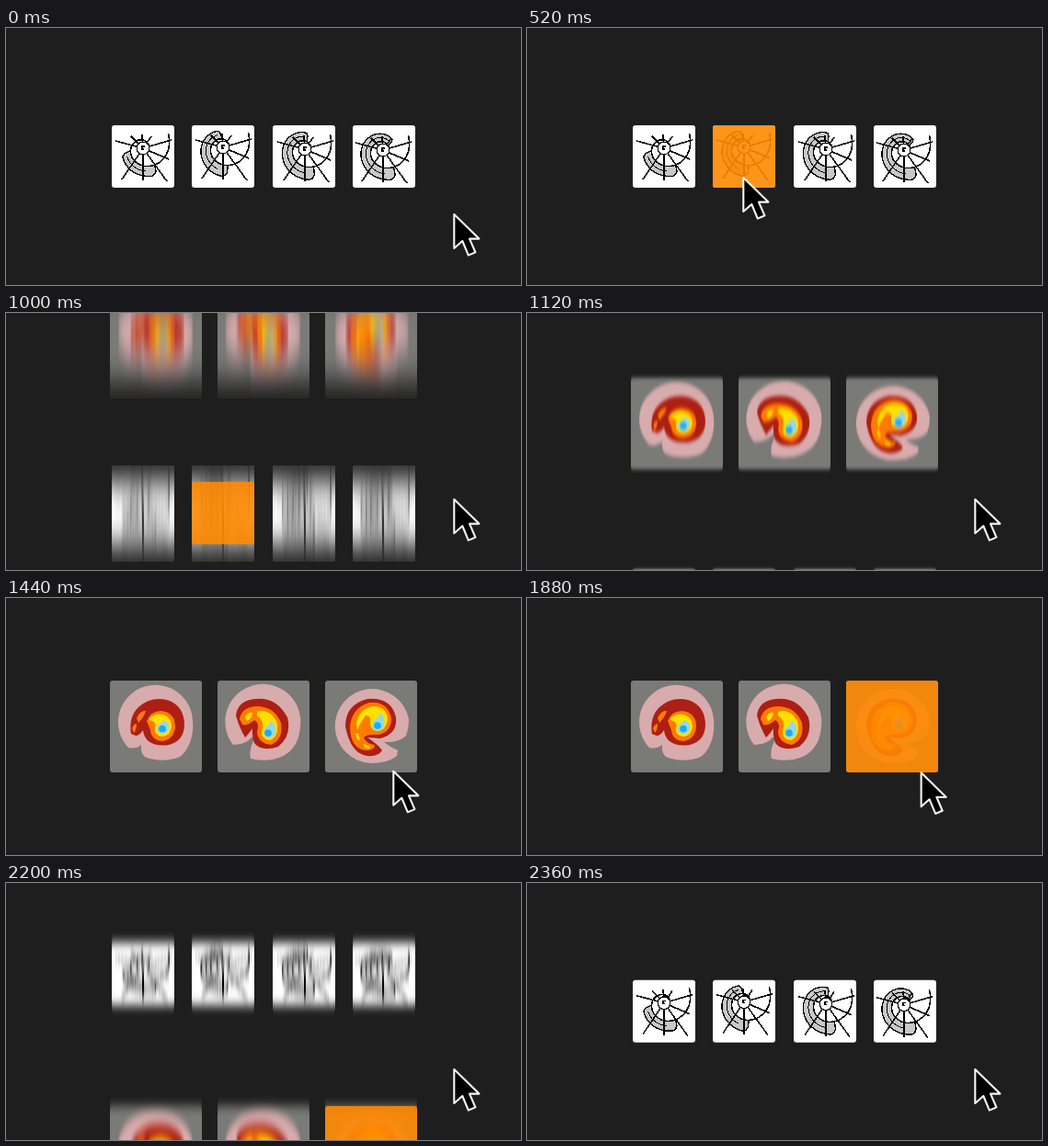
Recreate the animation shown at these times as an HTML page. Size 560 by 280 pixels, loop 2.4 s.

```html
<!DOCTYPE html>
<html lang="en">
<head>
<meta charset="utf-8">
<title>Picker</title>
<style>
  html, body { margin: 0; width: 100%; height: 100%; overflow: hidden; background: #1e1e1e; }
  svg { display: block; width: 560px; height: 280px; }
</style>
</head>
<body>
<svg id="stage" viewBox="0 0 560 280">
  <defs>
    <filter id="blurA" filterUnits="userSpaceOnUse" x="0" y="-18" width="560" height="104" color-interpolation-filters="sRGB"><feGaussianBlur stdDeviation="0 0"/></filter>
    <filter id="blurB" filterUnits="userSpaceOnUse" x="0" y="-18" width="560" height="136" color-interpolation-filters="sRGB"><feGaussianBlur stdDeviation="0 0"/></filter>
  </defs>
  <g id="rowA"><g class="tiles"></g><rect class="pick" x="202" width="68" height="68" rx="3"/></g>
  <g id="rowB"><g class="tiles"></g><rect class="pick" x="347" width="100" height="100" rx="3"/></g>
  <path id="cursor" d="M1.3 2V39L10.3 31L16.8 46.6L24.4 43.4L18 28.6H28.4Z" fill="#000" stroke="#f4f4f4" stroke-width="2.1" stroke-linejoin="round"/>
</svg>
<script>
const LOOP = 2400, STEP = 40, TRAVEL = 194;
const HOME = [486, 201], PICK_A = [234, 161], PICK_B = [398, 182];
const $ = s => document.querySelector(s);
const path = (d, fill, extra = '') => `<path d="${d}" fill="${fill}" ${extra}/>`;

// Points around a centre; angles run counter-clockwise from the top.
function curve([cx, cy], radius, from, to) {
  const pts = [], n = Math.ceil(Math.abs(to - from) / 0.1);
  for (let i = 0; i <= n; i++) {
    const a = from + (to - from) * i / n, r = radius(a);
    pts.push((cx - r * Math.sin(a)).toFixed(1) + ' ' + (cy - r * Math.cos(a)).toFixed(1));
  }
  return pts.join('L');
}

// Sketched shells: x, centre, outer radius, start and end angle of the grey chamber.
const shells = [
  [115, [34, 25], 16.5, 1.75, 3.75],
  [202, [34, 24], 17.5, 0.1, 3.4],
  [290, [35, 26], 18, -0.3, 3.6],
  [377, [33, 27], 17.5, -0.9, 3.7]
];
const rays = [[-30, -8], [-13, -13], [-1, -15], [9, -13], [31, -9], [28, 12], [26, 36], [0, 35], [-23, 34]];

function shell([x, c, size, from, to]) {
  const inner = a => 9 * Math.exp(0.24 * a);
  const full = a => size * Math.exp(0.19 * a);
  const taper = a => Math.sqrt(Math.max(0, Math.min(1, (a - from) / 0.2, (to - a) / 0.25)));
  const outer = a => inner(a) + (full(a) - inner(a)) * taper(a);
  const middle = a => (inner(a) + full(a)) / 2;
  const chamber = 'M' + curve(c, outer, from, to) + 'L' + curve(c, inner, to, from) + 'Z';
  const lines = rays.map(([dx, dy]) => {
    const k = 7 / Math.hypot(dx, dy);
    return `M${c[0] + dx * k} ${c[1] + dy * k}L${c[0] + dx} ${c[1] + dy}`;
  }).join('');
  const pen = w => `stroke="#000" stroke-width="${w}"`;
  return `<g transform="translate(${x})" shape-rendering="crispEdges">
    <rect width="68" height="68" rx="3" fill="#fff" shape-rendering="auto"/>
    ${path(chamber, '#c8c8c8', pen(1.4))}
    ${path('M' + curve(c, middle, from + 0.3, to - 0.5), 'none', pen(1))}
    ${path('M' + curve(c, inner, -1.6, 5.25), 'none', pen(1.6))}
    ${path(lines, 'none', pen(1.6))}
    <circle cx="${c[0]}" cy="${c[1]}" r="6.8" fill="#fff" ${pen(1.4)}/>
    ${path(`M${c[0] + 2} ${c[1] - 2}h-3v3h2`, 'none', pen(1.2))}
  </g>`;
}

// Heat maps: x, core, then pink, red, orange, yellow and pale layers.
const heat = ['#d8abad', '#ad1f12', '#ff7b00', '#ffe000', '#92d8ec'];
const maps = [
  [113, [57, 52.5],
    'M20 73A40.5 40.5 0 1 1 90 44C92 62 84 78 76 83C64 88 50 88 38 83Q33 79 34 70Q28 75 20 73Z',
    'M23 58Q20 40 31 29Q44 17 62 21Q81 27 81 49Q80 66 64 70Q50 72 42 66Q37 62 36 54Q32 60 28 60Z',
    'M40 44Q44 33 56 33Q71 35 71 50Q70 64 57 66Q45 65 44 54ZM29 41Q33 32 39 33Q38 38 31 46ZM24 52Q26 47 29 47Q29 53 26 57Z',
    'M43 41Q50 35 58 37Q67 40 67 50Q66 60 57 61Q48 60 49 52Q52 45 43 43Z',
    'M58 43Q65 45 64 53Q61 59 55 58Q49 55 51 49Q55 48 58 43Z'],
  [230, [55, 57],
    'M17 70A41 41 0 1 1 90 50Q88 80 60 86Q46 88 36 85Q34 76 38 68Q42 60 37 62Q30 70 17 70Z',
    'M20 38Q22 22 40 20Q64 17 76 40Q81 60 66 72Q48 78 40 68Q37 60 38 52Q34 58 30 62Q24 52 20 38Z',
    'M24 42Q26 29 42 28Q62 28 69 46Q72 64 58 70Q44 68 43 56Q46 46 40 43Q32 50 27 48Z',
    'M43 34Q56 30 64 44Q68 60 57 65Q47 64 48 55Q52 44 43 38ZM30 40Q33 34 38 35Q37 42 32 44Z',
    'M57 44Q64 46 63 57Q60 63 54 62Q49 59 51 52Q56 50 57 44Z'],
  [347, [57, 49],
    'M91 42A40.5 40.5 0 1 0 50 90Q68 90 78 82L79 76Q70 72 64 67Q80 68 88 60Q91 52 91 42Z',
    'M22 50Q22 26 46 20Q72 18 77 40Q79 58 60 63Q48 62 46 62Q58 70 62 76Q58 83 46 82Q28 80 22 50Z',
    'M27 52Q28 30 48 24Q68 22 72 41Q72 56 58 59Q46 58 42 62Q45 69 54 70Q54 76 44 76Q28 74 27 52Z',
    'M34 46Q38 30 52 28Q67 28 68 42Q66 55 56 55Q48 53 49 44Q50 38 44 38Q38 46 35 54ZM33 58l3-1 2 8-3-1zM42 69l7 3-1 2-5-1z',
    'M60 35Q66 40 64 50Q60 56 54 54Q49 49 53 43Q58 42 60 35Z']
];

const heatMap = ([x, [bx, by], ...layers]) => `<g transform="translate(${x})">
  <rect width="100" height="100" rx="3" fill="#7a7a77"/>
  ${layers.map((d, i) => path(d, heat[i])).join('')}
  <circle cx="${bx}" cy="${by}" r="3.8" fill="#1eaaf0"/></g>`;

$('#rowA .tiles').innerHTML = shells.map(shell).join('');
$('#rowB .tiles').innerHTML = maps.map(heatMap).join('');
document.querySelectorAll('.pick').forEach(p => p.setAttribute('fill', 'rgba(255,137,2,.9)'));

const clamp = v => Math.min(1, Math.max(0, v));
const ramp = (t, from, to) => clamp((t - from) / (to - from));

// Scroll curve with its slope, which drives the vertical blur.
function scroll(t, start) {
  const x = ramp(t, start, start + 400), a = 5.05, b = 1.45, rest = 1 - x ** b;
  return { pos: 1 - rest ** a, speed: a * b * rest ** (a - 1) * x ** (b - 1) };
}

function place(name, y, blur, picked) {
  const row = $('#row' + name);
  row.setAttribute('transform', `translate(0 ${y.toFixed(2)})`);
  row.querySelector('.pick').style.display = picked ? '' : 'none';
  $(`#blur${name} feGaussianBlur`).setAttribute('stdDeviation', `0 ${blur.toFixed(2)}`);
  const tiles = row.querySelector('.tiles');
  if (blur > 0.1) tiles.setAttribute('filter', `url(#blur${name})`);
  else tiles.removeAttribute('filter');
}

function draw(time) {
  const t = Math.floor(time % LOOP / STEP) * STEP;
  const second = t >= 1640;
  const { pos, speed } = scroll(t, second ? 2040 : 920);
  const blur = 2.9 * speed * speed;
  const leave = TRAVEL * pos, enter = TRAVEL * (pos - 1);
  place('A', 106 + (second ? enter : leave), blur, t >= 520 && !second);
  place('B', 90 + (second ? leave : enter), blur, second);

  const late = t >= 1000, shift = late ? 1120 : 0, goal = late ? PICK_B : PICK_A;
  const k = ramp(t - shift, 200, 360) - ramp(t - shift, 680, 920);
  const [x, y] = HOME.map((h, i) => h + (goal[i] - h) * k);
  $('#cursor').setAttribute('transform', `translate(${x} ${y})`);
}

const begin = performance.now();
function tick() {
  draw(performance.now() - begin);
  requestAnimationFrame(tick);
}
draw(0);
requestAnimationFrame(tick);
</script>
</body>
</html>
```
